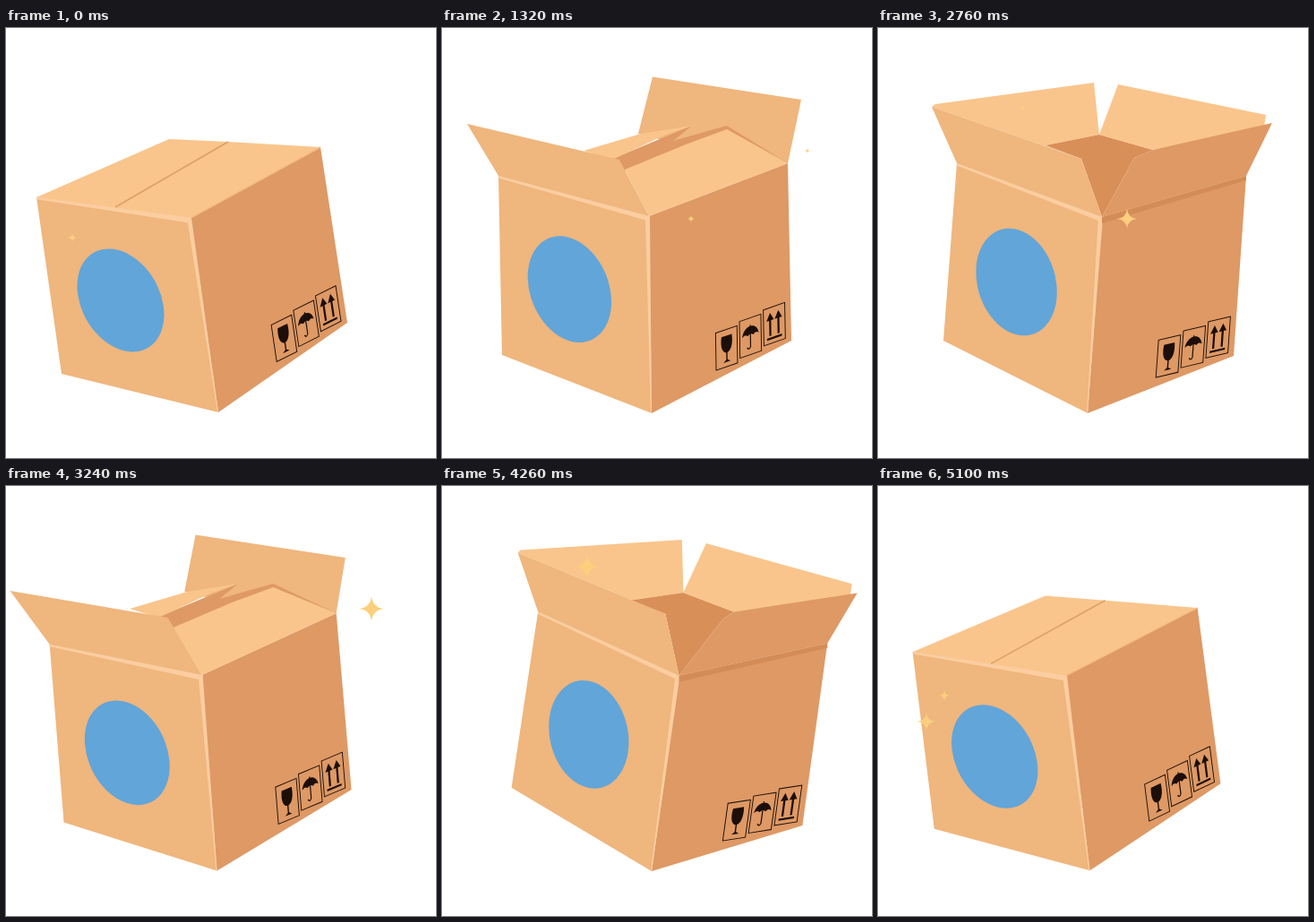
Animation of 480 by 480 pixels, one loop 5.16 s. Source, as an HTML page with a canvas:

```html
<!DOCTYPE html>
<html lang="en">
<head>
<meta charset="utf-8">
<title>Cardboard box</title>
<style>
html, body { margin: 0; width: 100%; height: 100%; overflow: hidden; background: #fff; }
canvas { display: block; width: 480px; height: 480px; }
</style>
</head>
<body>
<canvas id="stage" width="480" height="480"></canvas>
<script>
const ctx = document.getElementById('stage').getContext('2d');
const LOOP = 5160, STEP = 60, SWING = 1720;
const FRONT = '#efb67d', SIDE = '#de9965', LID = '#f9c58c', INNER = '#d98f58',
      EDGE = '#fbcda0', SHADE = '#d48c57', INK = '#1c0e08', STAR = '#fbcf7d';

// [time, value] pairs, linear between them
function track(keys, t) {
  if (t <= keys[0][0]) return keys[0][1];
  for (let i = 1; i < keys.length; i++) {
    const [a, va] = keys[i - 1], [b, vb] = keys[i];
    if (t <= b) return va + (vb - va) * (t - a) / (b - a);
  }
  return keys[keys.length - 1][1];
}

const mix = (a, b, k) => [a[0] + (b[0] - a[0]) * k, a[1] + (b[1] - a[1]) * k];

// x of the upper front corner; it drives the whole pose
const LEAN = [[0, 206], [340, 229], [380, 231], [540, 244], [860, 267.5], [980, 259],
  [1040, 250], [1240, 237], [1320, 231], [1660, 210], [1720, 206]];

const STARS = [
  { x: 162, y: 90, keys: [[300, 0], [340, 10], [380, 17], [450, 17], [570, 4], [700, 14], [900, 14], [1040, 3], [1070, 0]] },
  { x: 278, y: 213, keys: [[940, 0], [1040, 11], [1150, 14], [1320, 4], [1350, 0]] },
  { x: 408, y: 137, keys: [[1160, 0], [1240, 15], [1325, 2], [1430, 10], [1520, 14], [1620, 4], [1655, 0]] },
  { x: 74, y: 234, keys: [[1600, 0], [1660, 6], [1720, 5], [1780, 0]] },
  { x: 54, y: 263, keys: [[1560, 0], [1620, 10], [1660, 10], [1715, 0]] }
];

// body corners while leaning left, upright and leaning right
const BODY = {
  tl: [[34, 189], [63, 165], [88, 151]],
  bl: [[62, 386], [67, 365], [73, 349]],
  f: [[206, 212], [231, 210], [250, 211]],
  b: [[237, 429], [234, 430], [234, 430]],
  tr: [[351, 133], [386, 151], [411, 165]],
  br: [[381, 329], [390, 349], [397, 366]]
};

function bodyAt(s) {
  const c = {};
  for (const n in BODY) {
    const [l, m, r] = BODY[n];
    c[n] = s < 231 ? mix(l, m, (s - 206) / 25) : mix(m, r, (s - 231) / 19);
  }
  return c;
}

function poly(color, ...pts) {
  ctx.beginPath();
  pts.forEach(p => ctx.lineTo(p[0], p[1]));
  ctx.closePath();
  ctx.fillStyle = color;
  ctx.fill();
}

function line(color, width, ...pts) {
  ctx.beginPath();
  pts.forEach(p => ctx.lineTo(p[0], p[1]));
  ctx.strokeStyle = color;
  ctx.lineWidth = width;
  ctx.stroke();
}

// run draw() with a w by h rectangle mapped on three corners
function onPlane(o, x, y, w, h, draw) {
  ctx.save();
  ctx.transform((x[0] - o[0]) / w, (x[1] - o[1]) / w, (y[0] - o[0]) / h, (y[1] - o[1]) / h, o[0], o[1]);
  draw();
  ctx.restore();
}

function glass() {
  ctx.beginPath();
  ctx.moveTo(7, 7);
  ctx.lineTo(19.5, 7);
  ctx.bezierCurveTo(21, 19, 18, 25, 14, 26);
  ctx.lineTo(14, 34);
  ctx.lineTo(17.5, 36.5);
  ctx.lineTo(9, 36.5);
  ctx.lineTo(12.5, 34);
  ctx.lineTo(12.5, 26);
  ctx.bezierCurveTo(8.5, 25, 5, 19, 7, 7);
  ctx.fill();
}

function umbrella() {
  ctx.beginPath();
  ctx.moveTo(3, 20);
  ctx.bezierCurveTo(5, 6, 21, 6, 23, 20);
  ctx.quadraticCurveTo(19.5, 16.5, 16.5, 20);
  ctx.quadraticCurveTo(13, 16.5, 9.5, 20);
  ctx.quadraticCurveTo(6.5, 16.5, 3, 20);
  ctx.fill();
  ctx.beginPath();
  ctx.moveTo(13, 8);
  ctx.lineTo(13, 33);
  ctx.quadraticCurveTo(11, 37, 9, 33);
  ctx.stroke();
}

function arrows() {
  for (const x of [8, 18]) {
    poly(INK, [x, 6], [x + 4.5, 15], [x - 4.5, 15]);
    ctx.fillRect(x - 1.2, 14, 2.4, 19);
  }
  ctx.fillRect(4, 35, 18, 2.4);
}

function drawLabels(c) {
  const at = (u, v) => mix(mix(c.f, c.tr, u), mix(c.b, c.br, u), v);
  [glass, umbrella, arrows].forEach((icon, i) => {
    const u = 0.463 + i * 0.171, w = 0.153;
    onPlane(at(u, 0.753), at(u + w, 0.769), at(u, 0.951), 26, 42, () => {
      ctx.fillStyle = ctx.strokeStyle = INK;
      ctx.lineWidth = 1;
      ctx.strokeRect(0, 0, 26, 42);
      ctx.lineWidth = 1.3;
      icon();
    });
  });
}

function drawBody(c) {
  poly(FRONT, c.tl, c.f, c.b, c.bl);
  poly(SIDE, c.f, c.tr, c.br, c.b);
  poly(EDGE, c.tl, c.f, [c.f[0] + 1, c.f[1] + 6], mix(c.tl, c.bl, 0.012));
  poly(EDGE, [c.f[0] - 4, c.f[1]], [c.f[0] + 1, c.f[1]], c.b, [c.b[0] - 1, c.b[1]]);
  onPlane(c.tl, c.f, c.bl, 1, 1, () => {
    ctx.beginPath();
    ctx.ellipse(0.46, 0.53, 0.278, 0.29, 0, 0, Math.PI * 2);
    ctx.fillStyle = '#62a5d9';
    ctx.fill();
  });
  drawLabels(c);
}

function drawClosed(c, s) {
  const d = s - 206, back = [182 + d * 1.2, 124 - d * 0.4];
  drawBody(c);
  poly(LID, c.tl, back, [248 + d * 1.4, 127 + d * 0.2], c.tr, c.f);
  line('#dca069', 1.6, [122 + d, 200 - d * 0.4], [248 + d * 1.4, 127 + d * 0.2]);
  line('#f4bd86', 1.5, c.f, c.tr);
}

function drawHalf(c, s) {
  const d = s - 231, p = (x, y, k = 1.6) => [x + d * k, y];
  const tip = p(28, 107, 1.9);
  tip[1] -= d * 0.8;
  poly(FRONT, p(235, 54.5, 1.9), p(401, 80, 1.8), c.tr, p(258, 128), p(219, 118));
  drawBody(c);
  poly(SIDE, p(190, 146), p(279, 109), p(258, 126), p(318, 109), c.tr, p(204, 160, 1.4));
  poly(LID, p(158, 137), p(222, 118), p(279, 109), p(250, 119), p(190, 147));
  poly(LID, c.f, c.tr, p(318, 113), p(272, 130), p(204, 158, 1.4));
  poly(FRONT, tip, p(198, 147, 1.4), c.f, c.tl);
}

function drawOpen(c, s) {
  const k = (s - 237) / 13;
  const p = (x0, y0, x1, y1) => mix([x0, y0], [x1, y1], k);
  const rear = p(227, 119, 247, 119);
  const inL = p(167, 134, 187, 131), inR = p(290, 132, 307, 136);
  const tipL = p(38, 100, 60, 88), midL = p(207, 149, 227, 146);
  const tipR = p(419, 94, 440, 106), midR = p(261, 142, 286, 145);
  drawBody(c);
  poly(SHADE, c.f, c.tr, [c.tr[0], c.tr[1] + 5], [c.f[0], c.f[1] + 7]);
  poly(LID, tipL, p(43, 97, 64, 85), p(217, 62, 241, 61), rear, inL, midL);
  poly(INNER, inL, rear, inR, midR, c.f, midL);
  poly(LID, p(244, 62, 268, 63), p(411, 86, 433, 97), p(409, 100, 431, 111), inR, rear);
  poly(SIDE, tipR, inR, midR, c.f, c.tr);
  poly(FRONT, tipL, midL, c.f, c.tl);
}

function drawStar(x, y, r) {
  if (r < 0.5) return;
  const q = r * 0.13;
  ctx.beginPath();
  ctx.moveTo(x, y - r);
  for (let i = 0; i < 4; i++) {
    const a = i * Math.PI / 2, m = a - Math.PI / 4;
    ctx.quadraticCurveTo(x + q * Math.cos(m), y + q * Math.sin(m), x + r * Math.cos(a), y + r * Math.sin(a));
  }
  ctx.closePath();
  ctx.fillStyle = STAR;
  ctx.fill();
}

function render(ms) {
  const t = Math.floor((ms % LOOP) / STEP) * STEP, p = t % SWING;
  const s = track(LEAN, p), c = bodyAt(s);
  ctx.fillStyle = '#fff';
  ctx.fillRect(0, 0, 480, 480);
  if (p < 250 || p >= 1530) drawClosed(c, s);
  else if (s < 234.8) drawHalf(c, s);
  else drawOpen(c, s);
  for (const star of STARS) drawStar(star.x, star.y, track(star.keys, p < 200 ? p + SWING : p));
}

const start = performance.now();
function tick() {
  render(performance.now() - start);
  requestAnimationFrame(tick);
}
tick();
</script>
</body>
</html>
```
